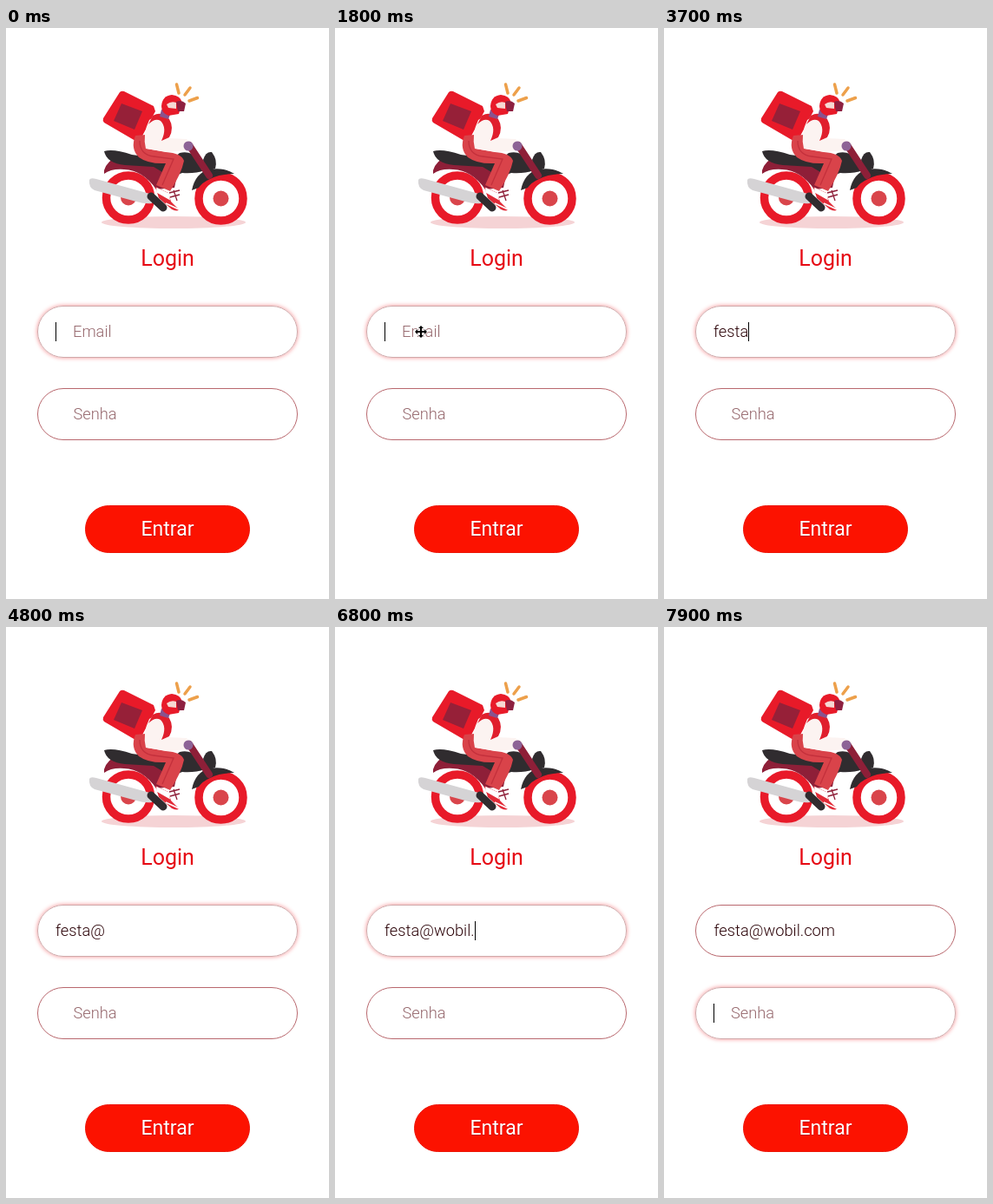
Recreate the animation shown at these times as an HTML page. Size 372 by 658 pixels, loop 8 s.

```html
<!DOCTYPE html>
<html lang="pt">
<head>
<meta charset="utf-8">
<title>Login</title>
<style>
  html, body { margin: 0; width: 100%; height: 100%; overflow: hidden; background: #fff; }
  body { position: relative; font-family: Roboto, sans-serif; }
  svg { position: absolute; left: 0; top: 0; overflow: visible; }
  h1 {
    position: absolute; left: 0; top: 250px; width: 372px; margin: 0;
    font-size: 25px; font-weight: 400; line-height: 31px; text-align: center; color: #e60a14;
  }
  .field {
    position: absolute; left: 36px; width: 300px; height: 60px; box-sizing: border-box;
    border: 1px solid #b9686e; border-radius: 30px;
    font-size: 18.3px; font-weight: 300; line-height: 58px; white-space: pre; color: #2c0409;
  }
  .field.focus { border-color: #cfa9aa; box-shadow: 0 0 5px #f58c8f; }
  .hint { position: absolute; left: 40.5px; color: #96686d; }
  .focus .hint { left: 40px; }
  .value { position: absolute; left: 20.5px; }
  .focus .value { left: 20px; }
  .caret {
    display: inline-block; width: 1px; height: 22px; margin-top: -2px;
    vertical-align: middle; background: #000;
  }
  #email { top: 320px; }
  #senha { top: 415px; }
  .button {
    position: absolute; left: 91px; top: 550px; width: 190px; height: 55px; box-sizing: border-box;
    border: 1px solid #ec1506; border-radius: 28px; background: #fc1200;
    color: #fff; font-size: 23px; line-height: 53px; text-align: center; text-shadow: 0 1px 1px #8008;
  }
</style>
</head>
<body>
<svg width="372" height="240" viewBox="0 0 372 240" style="filter:blur(.5px)">
  <defs>
    <g id="wheel">
      <circle r="25.5" fill="#fff" stroke="#e81a29" stroke-width="9.5"/>
      <circle r="9" fill="#d9454b"/>
    </g>
  </defs>
  <ellipse cx="193" cy="224" rx="83" ry="7" fill="#f5d3d5"/>
  <use href="#wheel" x="141" y="195.500"/>
  <use href="#wheel" x="247.500" y="196.500"/>

  <!-- motorbike -->
  <path d="M113 164Q117 152 128 149L200 155 194 184 173 186Q158 164 136 163Q121 162 113 168Z" fill="#8e1f38"/>
  <path d="M113 142Q124 139 145 146L190 152 200 144Q213 141 222 151L229 164Q218 168 203 167L190 172 170 160 137 158Q116 156 113 142Z" fill="#302c2f"/>
  <path d="M227 152Q230 142 237 143Q244 152 241 162Q234 165 229 161Z" fill="#302c2f"/>
  <path d="M214 187Q218 167 234 163Q251 160 263 168Q246 168 235 174Q226 178 222 184Z" fill="#302c2f"/>
  <path d="M211 135L234 170" stroke="#8e1f38" stroke-width="8" stroke-linecap="round"/>
  <path d="M96 175Q97 172 104 174L162 190Q172 193 168 202Q160 203 150 200L102 187Q95 184 96 175Z" fill="#d5d3d5"/>

  <!-- delivery box -->
  <path d="M131 74Q133 72 136 73L170 90 172 96 155 128Q152 132 149 130L113 109Q111 107 112 104Z" fill="#e81a29"/>
  <path d="M133 87L157 96 148 117 124 107Z" fill="#962038"/>

  <!-- rider -->
  <path d="M149 124Q143 139 153 149Q164 157 184 156L173 181 189 188Q202 168 205 153Q202 144 184 143L162 139 161 123Z" fill="#d9434a"/>
  <path d="M154 130Q154 146 170 148L193 151 180 181" fill="none" stroke="#c4303c" stroke-width="1.3"/>
  <path d="M165 106Q176 98 184 108L187 127 208 128Q215 134 209 141L186 143 161 139Q157 122 165 106Z" fill="#fcf3f1"/>
  <path d="M169 101Q180 95 188 105Q194 115 188 126L179 130Q186 115 178 107Q172 103 164 111Z" fill="#e01f2d"/>
  <path d="M179 94L190 97 187 105 177 102Z" fill="#89538e"/>
  <path d="M179 90Q180 78 191 77Q201 78 203 86L199 99 187 101Q179 98 179 90Z" fill="#e81a29"/>
  <path d="M185 88Q190 84 196 86L196 93 187 92Z" fill="#f6d9d4"/>
  <path d="M196 85Q202 82 207 87L205 96 198 96Z" fill="#8e2040"/>
  <circle cx="210" cy="136" r="5.5" fill="#8d6396"/>
  <path d="M167 194L181 207" stroke="#302c2f" stroke-width="9" stroke-linecap="round"/>
  <path d="M172 183L187 190 190 200 199 209Q198 212 191 209L176 196Z" fill="#e22b38"/>
  <path d="M174 185L187 191 188 197 174 189ZM184 202L199 209" fill="#fff" stroke="#fff" stroke-width="1.5"/>
  <path d="M188 190L200 187M189 195L200 192M193 187L197 199" fill="none" stroke="#8e1f38" stroke-width="1.3"/>
  <path d="M196.500 65L199 75M212 69L206 77M220.500 80.500L211 84" stroke="#eda04b" stroke-width="3.500" stroke-linecap="round"/>
</svg>

<h1>Login</h1>
<div class="field" id="email"><span class="hint">Email</span><span class="value"><span class="text"></span><i class="caret"></i></span></div>
<div class="field" id="senha"><span class="hint">Senha</span><span class="value"><span class="text"></span><i class="caret"></i></span></div>
<div class="button">Entrar</div>

<svg id="pointer" width="1" height="1">
  <path d="M0-7L3-4H1V-1H4V-3L7 0 4 3V1H1V4H3L0 7-3 4H-1V1H-4V3L-7 0-4-3V-1H-1V-4H-3Z" stroke="#fff" stroke-width="1.500" paint-order="stroke"/>
</svg>

<script>
  const LOOP = 8000, STEP = 100, BLINK = 500, TAB = 7900;
  const address = 'festa@wobil.com';
  const keyTimes = [2300, 2500, 2800, 3200, 3400, 4300, 4900, 5200, 5400, 5900, 6100, 6800, 7000, 7300, 7600];
  const pointerIn = 600, pointerRest = 900;

  const field = id => {
    const root = document.getElementById(id);
    const part = name => root.querySelector('.' + name);
    return { root, hint: part('hint'), text: part('text'), caret: part('caret') };
  };
  const email = field('email'), senha = field('senha');
  const pointer = document.getElementById('pointer');
  const show = (el, on) => { el.style.visibility = on ? 'visible' : 'hidden'; };

  function drawField(f, value, focused, caretOn) {
    f.root.classList.toggle('focus', focused);
    f.text.textContent = value;
    show(f.hint, !value);
    show(f.caret, focused && caretOn);
  }

  function drawPointer(t) {
    show(pointer, t >= pointerIn && t < keyTimes[0]);
    const p = Math.min(1, Math.max(0, (t - pointerIn) / (pointerRest - pointerIn)));
    const ease = 1 - (1 - p) ** 2;
    pointer.style.transform = `translate(${3 + 96 * ease}px, ${372 - 22 * ease}px)`;
  }

  function draw(time) {
    const t = Math.floor(time % LOOP / STEP) * STEP;
    const typed = keyTimes.filter(k => k <= t).length;
    const tabbed = t >= TAB;
    const lastKey = tabbed ? TAB : typed ? keyTimes[typed - 1] : -200;
    const caretOn = Math.floor((t - lastKey) / BLINK) % 2 === 0;
    drawField(email, address.slice(0, typed), !tabbed, caretOn);
    drawField(senha, '', tabbed, caretOn);
    drawPointer(t);
  }

  const start = performance.now();
  (function tick() {
    draw(performance.now() - start);
    requestAnimationFrame(tick);
  })();
</script>
</body>
</html>
```
